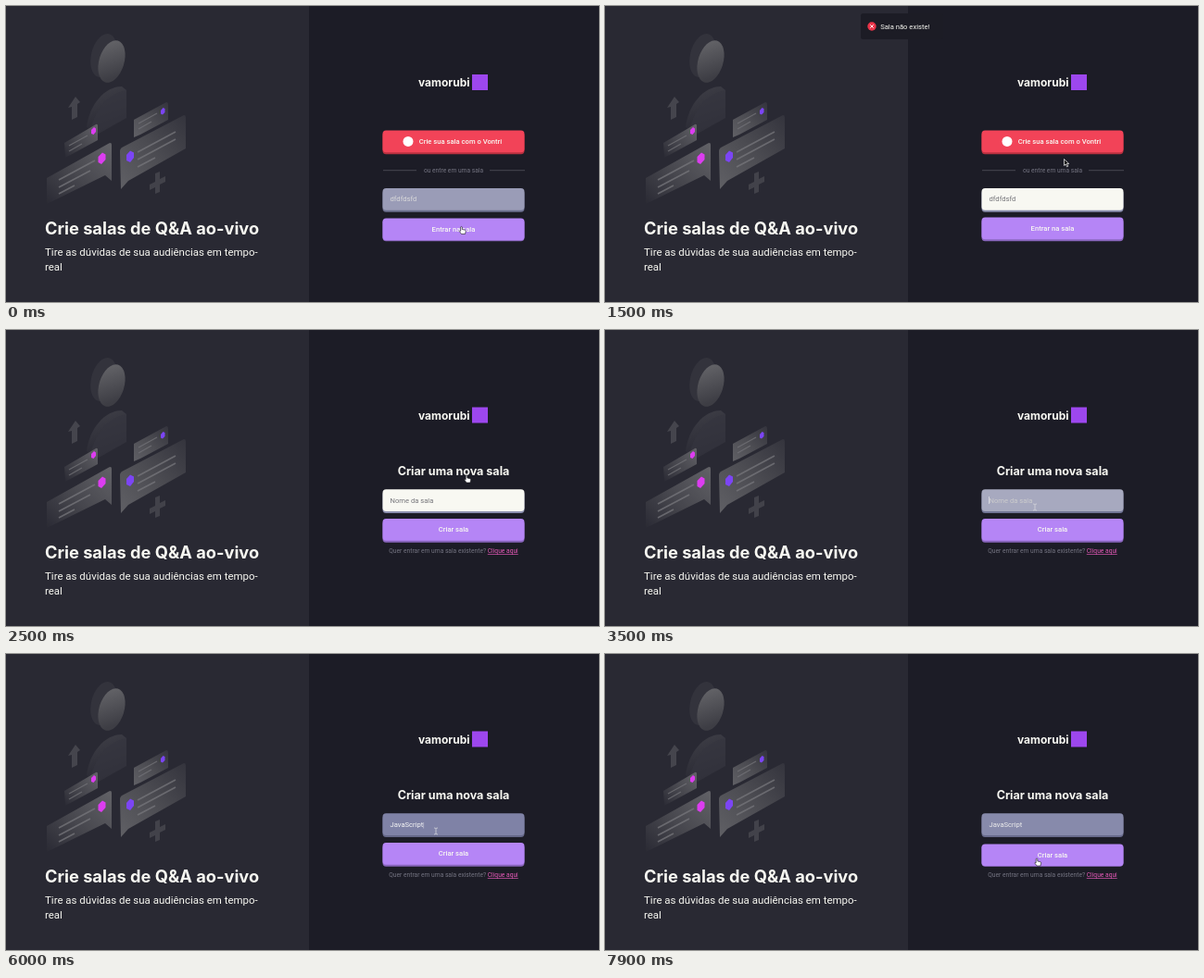
Recreate the animation shown at these times as an HTML page. Size 640 by 320 pixels, loop 8000 ms.

```html
<!DOCTYPE html>
<html lang="pt-BR">
<head>
<meta charset="utf-8">
<title>Salas de Q&amp;A</title>
<style>
  html, body { margin: 0; width: 100%; height: 100%; overflow: hidden; background: #1c1c26; }
  svg { display: block; width: 100vw; height: 100vh; }
  text { font: 400 7.63px Roboto, sans-serif; fill: #f8f8f2; white-space: pre; }
  .title { font: 700 18.25px Inter, sans-serif; }
  .heading { font: 700 12.55px Inter, sans-serif; }
  .brand { font: 700 12px Inter, sans-serif; }
  .sub { font-size: 11.47px; }
  .label { font-weight: 500; }
  .note { font-size: 6.68px; fill: #737380; }
  .mid { text-anchor: middle; }
</style>
</head>
<body>
<svg viewBox="0 0 640 320">
  <defs>
    <linearGradient id="head" x1="0" y1="0" x2=".4" y2="1"><stop stop-color="#68686c"/><stop offset="1" stop-color="#3d3d44"/></linearGradient>
    <linearGradient id="shade" x1="0" y1="0" x2=".3" y2="1"><stop stop-color="#404048"/><stop offset="1" stop-color="#292933"/></linearGradient>
    <linearGradient id="cardLeft" x1="1" y1="0" x2="0" y2="1"><stop stop-color="#626267"/><stop offset=".55" stop-color="#46464d"/><stop offset="1" stop-color="#2a2a34"/></linearGradient>
    <linearGradient id="cardRight" x1="0" y1="1" x2="1" y2="0"><stop stop-color="#606065"/><stop offset=".5" stop-color="#4c4c52"/><stop offset="1" stop-color="#34343d"/></linearGradient>
  </defs>
  <rect width="640" height="320" fill="#1c1c26"/>
  <rect width="327" height="320" fill="#292933"/>
  <g id="illustration">
    <ellipse cx="105.500" cy="53.500" rx="13.500" ry="24" transform="rotate(14 105.5 53.5)" fill="#33333c"/>
    <ellipse cx="114" cy="60" rx="13.500" ry="23.500" transform="rotate(17 114 60)" fill="url(#head)"/>
    <path d="M87 131C90 106 107 87 125 87L130 91V121L100 138Z" fill="url(#shade)"/>
    <path d="M92 131C97 110 112 94 130 91V121L100 138Z" fill="#36363f" opacity=".7"/>
    <path d="M67 110L75 98L80 104L77 106V120L71 123V109Z" fill="#45454d"/>
    <path d="M161 181L166 179V187L172 184V190L166 193V201L161 203V196L155 199V193L161 190Z" fill="#42424a"/>
    <path d="M63 148L97 128Q99 127 99 130V145L64 164Z" fill="url(#cardLeft)"/>
    <path d="M138 123L173 104Q175 104 175 107V123L145 139L138 142Z" fill="url(#cardRight)"/>
    <path d="M44 186L111 148.500Q114 147 114 150V189L107 183L44 214Z" fill="url(#cardLeft)"/>
    <path d="M123 157Q123 154 126 152.500L191 118.500Q194 117 194 121V154L132 189L124 198Z" fill="url(#cardRight)"/>
    <path d="M57 188L96 167M57 196L91 178M57 203L74 194M142 158L183 136M142 166L183 144M142 174L161 164" stroke="#77777c" stroke-width="1.700" opacity=".75"/>
    <path d="M68 151L88 140M68 157L82 149M143 127L163 116M143 133L157 125" stroke="#747479" stroke-width="1.300" opacity=".75"/>
    <path id="gem" d="M99.500 163L104 158.500L107.500 160.500V166L103 171L99.500 169Z" fill="#dc3df0"/>
    <path d="M130 161L134 156.500L138 158.500V164L134 169L130 167Z" fill="#7c45f5"/>
    <path d="M92 134L95 131L97 132.500V136L94.500 139L92 138Z" fill="#dc3df0"/>
    <path d="M167 113L169.500 110L171.500 111V115L169 117.500L167 116.500Z" fill="#7c45f5"/>
  </g>
  <text class="title" x="42" y="247">Crie salas de Q&amp;A ao-vivo</text>
  <text class="sub" x="42" y="270">Tire as dúvidas de sua audiências em tempo-</text>
  <text class="sub" x="42" y="285.500">real</text>
  <g id="scene"></g>
</svg>
<script>
const scene = document.getElementById('scene');
const LOOP = 8000, PAGE_AT = 2500;
const LEFT = 406.5, WIDTH = 153, CENTER = 483;

// Pointer stops: time, x, y
const stops = [
  [0, 491.5, 238.5], [400, 491.5, 238.5], [1500, 495.5, 165.5], [1900, 497, 157],
  [2600, 497, 157], [3400, 464, 191.5], [6600, 464, 191.5], [7000, 462.3, 213],
  [7500, 462.3, 213], [7900, 466, 221], [LOOP, 466, 221]
];
const word = 'JavaScript';
const keyTimes = [4500, 4700, 4800, 4900, 5100, 5300, 5400, 5700, 5800, 5900];

const ramp = (t, from, to) => Math.min(1, Math.max(0, (t - from) / (to - from)));
const ease = p => p * p * (3 - 2 * p);
const mix = (a, b, p) => `rgb(${a.map((v, i) => Math.round(v + (b[i] - v) * p))})`;
const box = (y, h, fill) =>
  `<rect x="${LEFT}" y="${y}" width="${WIDTH}" height="${h}" rx="3.7" fill="${fill}"/>`;

function pointerAt(t) {
  const i = stops.findIndex(s => s[0] > t);
  const [t0, x0, y0] = stops[i - 1], [t1, x1, y1] = stops[i];
  const p = ease(ramp(t, t0, t1));
  return { x: x0 + (x1 - x0) * p, y: y0 + (y1 - y0) * p };
}

const logo = dy => `<g transform="translate(0 ${dy})">
  <text class="brand" x="445" y="87">vamorubi</text>
  <rect x="503" y="74" width="17" height="17" fill="#9d47ee"/></g>`;

function button(y, label, push, face = '#b585f6', edge = '#8966bd', x = CENTER) {
  return box(y + 2, 23.7, edge) + box(y + push, 23.7, face) +
    `<text class="label mid" x="${x}" y="${y + 14.2 + push}">${label}</text>`;
}

// light: 0 = focused, 1 = idle
function field(y, text, light) {
  return box(y + 2, 23.7, mix([101, 104, 137], [139, 143, 174], light)) +
    box(y, 23.7, mix([127, 130, 166], [248, 248, 242], light)) +
    `<text x="414.5" y="${y + 14.2}" style="fill:${mix([246, 246, 246], [117, 117, 122], light)}">${text}</text>`;
}

function toast(t) {
  const p = ease(ramp(t, 500, 850));
  const icon = ease(ramp(t, 600, 950));
  return `<g transform="translate(0 ${-40 * (1 - p)})" opacity="${p}">
    <rect x="276" y="8" width="89" height="28" rx="2.5" fill="#1c1c25"/>
    <g transform="translate(288 22) scale(${icon})">
      <circle r="4.7" fill="#ea3449"/>
      <path d="M-1.7-1.7L1.7 1.7M-1.7 1.7L1.7-1.7" stroke="#fff" stroke-width="1"/></g>
    <text x="297.2" y="24.6">Sala não existe!</text></g>`;
}

function joinPage(t, pushGoogle, pushJoin) {
  const light = .22 + .78 * ramp(t, 0, 300);
  return logo(0) +
    button(134.5, 'Crie sua sala com o Vontri', pushGoogle, '#f24358', '#b9303f', 490.5) +
    `<circle cx="434" cy="${146.4 + pushGoogle}" r="5.5" fill="#fff"/>
    <path d="M407 177.700H443M522 177.700H560" stroke="#62626d" stroke-width=".6"/>
    <text class="note mid" x="${CENTER}" y="180">ou entre em uma sala</text>` +
    field(197, 'dfdfdsfd', light) + button(228.5, 'Entrar na sala', pushJoin);
}

function createPage(t, push) {
  const typed = word.slice(0, keyTimes.filter(k => k <= t).length);
  const light = t < 7000 ? 1 - ramp(t, 3360, 3570) : .07 * ramp(t, 7800, 7900);
  const caretOn = t >= 3500 && t < 4100 || t >= 4500 && t < 6200 || t >= 6700 && t < 7000;
  const caret = caretOn ? '<tspan dx="-.3" font-weight="300">|</tspan>' : '';
  const content = typed ? typed + caret : 'Nome da sala';
  const startCaret = caretOn && !typed
    ? '<path d="M414.500 180V188" stroke="#fff" stroke-width=".5"/>' : '';
  return logo(9.5) +
    `<text class="heading mid" x="${CENTER}" y="156.5">Criar uma nova sala</text>` +
    field(172.3, content, light) + startCaret + button(204, 'Criar sala', push) +
    `<text class="note mid" x="${CENTER}" y="241">Quer entrar em uma sala existente? <tspan fill="#e559b7" text-decoration="underline">Clique aqui</tspan></text>`;
}

const pointers = {
  arrow: '<path d="M0 0V7L1.700 5.500L3 8.300L4.300 7.700L3 5H5.200Z" fill="#111" stroke="#fff" stroke-width=".7"/>',
  hand: '<path d="M-.8 .4Q0-.5 .8 .4V3L4 3.700Q4.800 4 4.700 5L4 8H0L-2.200 5Q-2 3.800-.8 4.800Z" fill="#fff" stroke="#15151c" stroke-width=".6"/>',
  beam: '<path d="M-2-3.500Q0-3.500 0-2.500Q0-3.500 2-3.500M0-2.500V2.500M-2 3.500Q0 3.500 0 2.500Q0 3.500 2 3.500" fill="none" stroke="#d5d5dc" stroke-width=".8"/>'
};

function draw(now) {
  const t = now % LOOP;
  const { x, y } = pointerAt(t);
  const over = top => y >= top && y < top + 25.7;
  const joining = t < PAGE_AT;
  const onField = over(joining ? 197 : 172.3);
  const onButton = joining ? over(228.5) || over(134.5) : over(204) || t < 2700;
  const kind = onButton ? 'hand' : onField ? 'beam' : 'arrow';
  const page = joining
    ? joinPage(t, over(134.5) ? 1 : 0, over(228.5) ? 1 : 0) + toast(t)
    : createPage(t, over(204) ? (t > 7700 ? 1.5 : 1) : 0);
  scene.innerHTML = page + `<g transform="translate(${x} ${y})">${pointers[kind]}</g>`;
  requestAnimationFrame(draw);
}
requestAnimationFrame(draw);
</script>
</body>
</html>
```
